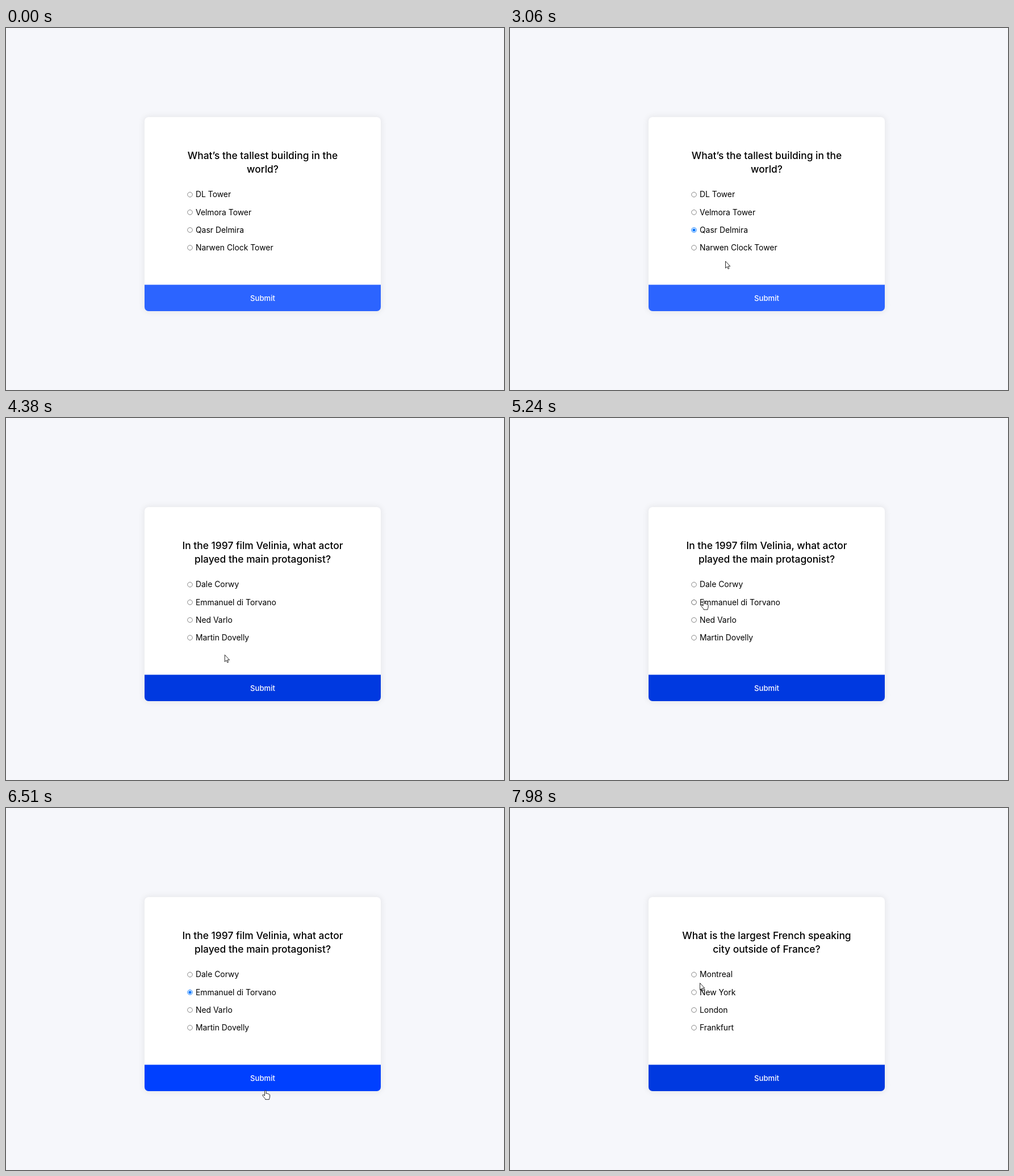
An HTML page for the animation above (8000 ms loop, 877 by 638 pixels).

```html
<!DOCTYPE html>
<html lang="en">
<head>
<meta charset="utf-8">
<title>Quiz</title>
<style>
  html, body { margin: 0; width: 100%; height: 100%; overflow: hidden; background: #f6f7fb; }
  svg { display: block; width: 877px; height: 638px; font-family: Inter, "Open Sans", sans-serif; }
  .head { font-size: 17.4px; font-weight: 550; text-anchor: middle; }
  .option { font-size: 13.9px; }
  .submit { font-size: 13.1px; font-weight: 500; text-anchor: middle; fill: #fff; }
  .cursor { fill: #fff; stroke: #111; stroke-width: .9; stroke-linejoin: round; }
</style>
</head>
<body>
<svg viewBox="0 0 877 638">
  <defs>
    <filter id="blur" x="-10%" y="-10%" width="120%" height="120%">
      <feGaussianBlur stdDeviation="5"/>
    </filter>
  </defs>
  <rect width="877" height="638" fill="#f6f7fb"/>
  <rect x="242" y="155" width="420" height="346" rx="9" fill="#646464" opacity=".1" filter="url(#blur)"/>
  <rect x="244" y="157" width="416" height="342" rx="7" fill="#fff"/>
  <path id="button" d="M244 452.6H660V492a7 7 0 0 1-7 7H251a7 7 0 0 1-7-7Z"/>
  <text class="submit" x="452" y="481">Submit</text>
  <text class="head" x="452" y="231.3"></text>
  <text class="head" x="452" y="255.4"></text>
  <g id="options"></g>
  <g id="pointer" class="cursor">
    <path id="arrow" d="M.5 .5V12.7L3.2 10.1 5.1 14.2 6.9 13.4 5 9.5H8.8Z"/>
    <path id="hand" d="M-2 8.4V.6a1.3 1.3 0 0 1 2.6 0V4.8q.2-.9 1.2-.8t1.2 1.2q.3-.6 1.2-.4t1 1.2q.4-.4 1.1-.1.8.3.8 1.3v3.2c0 1.5-1 2.6-1 3.6v1h-7v-1c-1-1.4-3.6-4-4.6-5.9-.7-1.4.8-2 1.8-1.2Z"/>
  </g>
</svg>
<script>
const LOOP = 8000;
const BLUE = "#2c64ff", BRIGHT = "#0040ff", DARK = "#0039e0";

const quiz = [
  { from: 0, head: ["What’s the tallest building in the", "world?"],
    options: ["DL Tower", "Velmora Tower", "Qasr Delmira", "Narwen Clock Tower"],
    answer: 2, press: 2510, check: 2600, submit: 3370 },
  { from: 3440, head: ["In the 1997 film Velinia, what actor", "played the main protagonist?"],
    options: ["Dale Corwy", "Emmanuel di Torvano", "Ned Varlo", "Martin Dovelly"],
    answer: 1, press: 5810, check: 5860, submit: 6800 },
  { from: 6860, head: ["What is the largest French speaking", "city outside of France?"],
    options: ["Montreal", "New York", "London", "Frankfurt"] }
];

const $ = id => document.getElementById(id);
const rowY = i => 293.6 + i * 31.2;
const point = (x, y) => ({ x, y });
const radio = i => point(327, rowY(i) - 3);
const label = i => point(342, rowY(i) - 2);
const submit = point(431, 468), edge = point(457.5, 498.7), below = point(464, 531);

// Each move starts where the last one ended and advances in equal steps
const moves = [];
function move(start, end, steps, to, from = moves[moves.length - 1].to) {
  moves.push({ start, end, steps, to, from });
}
move(420, 500, 2, point(845, 632), point(873, 636));
move(570, 570, 1, null);
move(720, 960, 4, point(241, 450), point(641, 674));
move(1035, 1190, 3, point(327, 349));
move(1350, 1810, 5, radio(2));
move(2830, 3230, 6, submit);
move(4090, 4690, 9, radio(2));
move(5020, 5240, 4, label(1));
move(6040, 6090, 2, edge);
move(6190, 6270, 2, below);
move(6350, 6510, 3, edge);
move(6550, 6800, 4, point(455, 489));
move(6930, 7660, 10, point(334, 360));
move(7740, 7980, 4, point(334, 308));

function pointerAt(t) {
  const m = moves.filter(item => item.start <= t).pop();
  if (!m || !m.to) return null;
  const pace = (m.end - m.start) / (m.steps - 1);
  const u = Math.min(Math.floor((t - m.start) / pace + 1e-6) + 1, m.steps) / m.steps;
  return point(m.from.x + (m.to.x - m.from.x) * u, m.from.y + (m.to.y - m.from.y) * u);
}

// What lies under the pointer: option row, button, and whether it shows a hand
function hit(pos, options) {
  const none = { row: -1, button: false, hand: false };
  if (!pos) return none;
  const { x, y } = pos;
  if (x > 244 && x < 660 && y > 453 && y < 499) return { row: -1, button: true, hand: true };
  for (let row = 0; row < 4; row++) {
    const dy = y - rowY(row);
    if (Math.hypot(x - 324, dy) < 5) return { row, button: false, hand: false };
    if (x >= 334 && x < 334 + options[row].length * 7.3 && Math.abs(dy) < 10)
      return { row, button: false, hand: true };
  }
  return none;
}

function make(tag, attrs) {
  const el = document.createElementNS("http://www.w3.org/2000/svg", tag);
  for (const k in attrs) el.setAttribute(k, attrs[k]);
  return $("options").appendChild(el);
}

const rows = [0, 1, 2, 3].map(i => ({
  ring: make("circle", { cx: 324, cy: rowY(i), r: 4.3, fill: "#fff", "stroke-width": .9 }),
  dot: make("circle", { cx: 324, cy: rowY(i), r: 2.6, fill: "#0075ff" }),
  text: make("text", { class: "option", x: 334, y: rowY(i) + 4.8 })
}));
const heads = document.querySelectorAll(".head");

const show = (el, on) => { el.style.display = on ? "" : "none"; };

// A clicked button keeps its dark focus colour until the next option is pressed
function buttonColor(t, over) {
  const focused = quiz.some((q, i) => t >= q.submit && !(t >= quiz[i + 1].press));
  return focused ? DARK : over ? BRIGHT : BLUE;
}

function draw(t) {
  const q = quiz.filter(item => item.from <= t).pop();
  const pos = pointerAt(t);
  const over = hit(pos, q.options);

  heads.forEach((el, i) => { el.textContent = q.head[i]; });
  rows.forEach((row, i) => {
    const mine = i === q.answer;
    const checked = mine && t >= q.check;
    const pressed = mine && t >= q.press;
    const color = checked ? "#0075ff" : pressed ? "#8d8d8d" : over.row === i ? "#4f4f4f" : "#767676";
    row.text.textContent = q.options[i];
    row.ring.setAttribute("stroke", color);
    show(row.dot, checked);
  });

  $("button").setAttribute("fill", buttonColor(t, over.button));
  show($("pointer"), pos);
  show($("hand"), over.hand);
  show($("arrow"), !over.hand);
  if (pos) $("pointer").setAttribute("transform", `translate(${pos.x} ${pos.y})`);
}

const begin = performance.now();
function tick() {
  draw((performance.now() - begin) % LOOP);
  requestAnimationFrame(tick);
}
tick();
</script>
</body>
</html>
```
